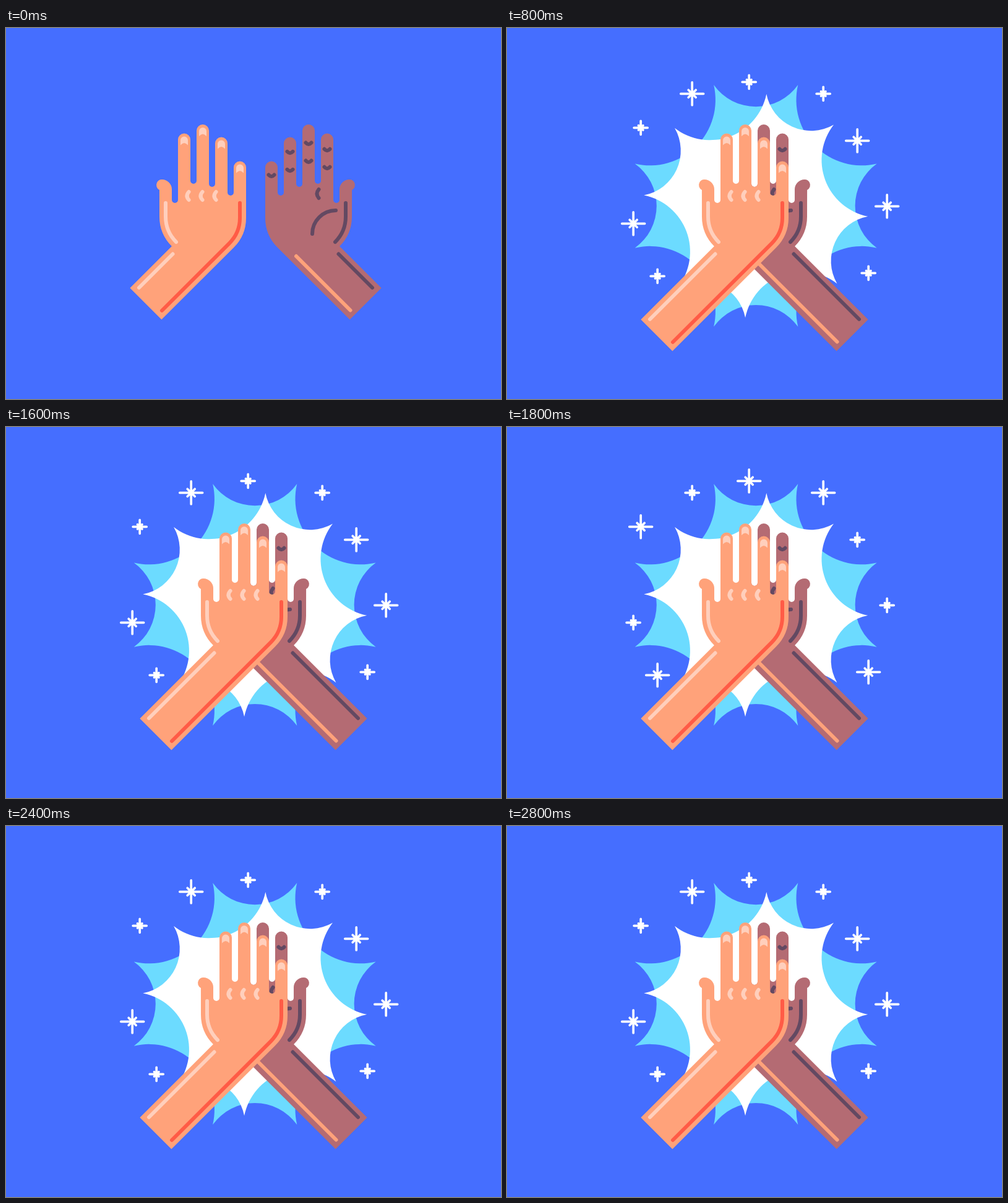
Write an HTML page with a canvas that moves like this. It is 800 by 600 pixels and loops after 3000 ms.

```html
<!DOCTYPE html>
<html lang="en">
<head>
<meta charset="utf-8">
<title>High five</title>
<style>
html, body { margin: 0; width: 100%; height: 100%; overflow: hidden; background: #456eff; }
canvas { display: block; }
</style>
</head>
<body>
<canvas id="stage" width="800" height="600"></canvas>
<script>
const ctx = document.getElementById('stage').getContext('2d');

const LOOP = 3000, CLAP = 500, SHINE = 800, BEAT = 200;
const BG = '#456eff', CYAN = '#6cdbff', WHITE = '#ffffff';
const SKIN = '#ffa27a', PALE = '#ffcfbc', RED = '#ff5b46';
const BROWN = '#b46b73', PLUM = '#634962';

const CENTER = { x: 402.2, y: 287.6 };
const MIRROR = 807;
const EDGE = 68, INSET = 58;
const UPPER_SUM = 621, LOWER_SUM = 723;   // x + y along the forearm edges
const TOPS = [170.5, 156, 176.5, 215.5];  // fingertips, index to little
const GAPS = [283, 252, 257, 271];        // floor of the gap before each finger

const rad = deg => deg * Math.PI / 180;
const fingerX = i => 288 + 30 * i;
const polar = (angle, r) => [Math.sin(rad(angle)) * r, -Math.cos(rad(angle)) * r];

function fill(path, color) {
  ctx.fillStyle = color;
  ctx.fill(path);
}

function stroke(path, color, width = 6) {
  ctx.strokeStyle = color;
  ctx.lineWidth = width;
  ctx.lineCap = 'round';
  ctx.stroke(path);
}

// Curved mark starting at x, y: control offset cx, cy and end offset dx, dy
function mark(x, y, cx, cy, dx, dy, color) {
  stroke(new Path2D(`M${x} ${y} q${cx} ${cy} ${dx} ${dy}`), color);
}

// Adds a point of the 45 degree line x + y = sum
function slant(path, sum, x) {
  path.lineTo(x, sum - x);
}

// reach is how much further the forearm extends along its diagonal
function handShape(reach) {
  const p = new Path2D();
  slant(p, UPPER_SUM, 200.4 - reach);
  p.arc(316, 305, EDGE, rad(135), Math.PI);
  p.arc(252, 254, 9, rad(117), rad(270));
  p.arc(252, 261, 16, rad(-90), 0);
  TOPS.forEach((top, i) => {
    p.arc(fingerX(i) - 15, GAPS[i] - 5, 5, Math.PI, 0, true);
    p.arc(fingerX(i), top + 10, 10, Math.PI, 0);
  });
  p.arc(320, 307, EDGE, 0, rad(45));
  slant(p, LOWER_SUM, 251.4 - reach);
  p.closePath();
  return p;
}

function handBase(reach, body, shine) {
  fill(handShape(reach), body);
  const thumb = new Path2D();
  thumb.arc(316, 305, INSET, rad(135), Math.PI);
  thumb.lineTo(258, 283);
  stroke(thumb, shine);
  const arm = new Path2D();
  slant(arm, UPPER_SUM + 14, 269.5);
  slant(arm, UPPER_SUM + 14, 215 - reach);
  stroke(arm, shine);
}

function lightHand(shift, reach) {
  ctx.save();
  ctx.translate(shift, 0);
  handBase(reach, SKIN, PALE);

  const side = new Path2D();
  side.moveTo(378, 283);
  side.arc(320, 307, INSET, 0, rad(45));
  slant(side, LOWER_SUM - 14, 252 - reach);
  stroke(side, RED);

  TOPS.forEach((top, i) => {
    const nail = new Path2D(`M${fingerX(i) - 6} ${top + 19} v-8 a6 6 0 0 1 12 0 v8 q-6 -7 -12 0 Z`);
    fill(nail, PALE);
  });
  for (let i = 0; i < 3; i++) mark(295.5 + 22 * i, 265, -6, 6.5, 0, 13, PALE);
  ctx.restore();
}

function darkHand(shift, reach) {
  ctx.save();
  ctx.translate(MIRROR + shift, 0);
  ctx.scale(-1, 1);
  handBase(reach, BROWN, PLUM);

  const side = new Path2D();
  slant(side, LOWER_SUM - 16, 338);
  slant(side, LOWER_SUM - 16, 250.5 - reach);
  stroke(side, SKIN);

  const palm = new Path2D();
  palm.arc(274, 333, 38, rad(-90), 0);
  stroke(palm, PLUM);
  mark(301.5, 261, 6, 7, 0, 14, PLUM);

  // Creases sit lower on longer fingers and repeat where there is room
  TOPS.forEach((top, i) => {
    const first = top + Math.max(23.5, 31 - (top - 156) * 0.3);
    for (let y = first; y < 245; y += 29) mark(fingerX(i) - 4.5, y - 1.5, 4.5, 5, 9, 0, PLUM);
  });
  ctx.restore();
}

// Eight tips joined by hollow arcs, short and long in turn
function burst(scale, turn, color) {
  const tips = [];
  for (let a = 0; a < 360; a += 90) tips.push(polar(a - 19.2, 207), polar(a + 19.2, 207));
  let d = `M${tips[0]}`;
  for (let i = 1; i <= 8; i++) {
    const r = i % 2 ? 83.6 : 106;
    d += ` A${r} ${r} 0 0 0 ${tips[i % 8]}`;
  }
  ctx.save();
  ctx.translate(CENTER.x, CENTER.y);
  ctx.rotate(rad(turn));
  ctx.scale(scale, scale);
  fill(new Path2D(d + ' Z'), color);
  ctx.restore();
}

function sparkle([x, y], big) {
  const arm = big ? 18.4 : 11, diag = big ? 6 : 3.7;
  const p = new Path2D();
  for (const [dx, dy] of [[arm, 0], [0, arm], [diag, diag], [diag, -diag]]) {
    p.moveTo(x - dx, y - dy);
    p.lineTo(x + dx, y + dy);
  }
  stroke(p, WHITE, 3.7);
}

function innerSparkles() {
  [-106, -64, -17, 18, 75, 117].forEach((angle, i) => {
    const [dx, dy] = polar(angle, i % 2 ? 166 : 146);
    sparkle([CENTER.x + dx, CENTER.y + dy], false);
  });
}

// Two groups around the burst trade sizes on every beat
function outerSparkles(swap) {
  const groups = [
    [[299, 106], [566, 182], [614, 288], [204, 316]],
    [[391, 87], [511, 106], [216, 161], [243, 401], [584, 396]]
  ];
  groups.forEach((group, i) => {
    for (const [x, y] of group) sparkle([x + 0.2, y + 0.3], swap === (i === 1));
  });
}

function draw(t) {
  ctx.fillStyle = BG;
  ctx.fillRect(0, 0, 800, 600);
  if (t < CLAP) {
    lightHand(0, 0);
    darkHand(0, 0);
    return;
  }
  burst(1, 0, CYAN);
  burst(0.878, 24.6, WHITE);
  if (t < SHINE) innerSparkles();
  else outerSparkles(Math.floor((t - SHINE) / BEAT) % 2 === 1);
  darkHand(-74, 51);
  lightHand(67, 51);
}

function tick() {
  draw(performance.now() % LOOP);
  requestAnimationFrame(tick);
}
tick();
</script>
</body>
</html>
```
